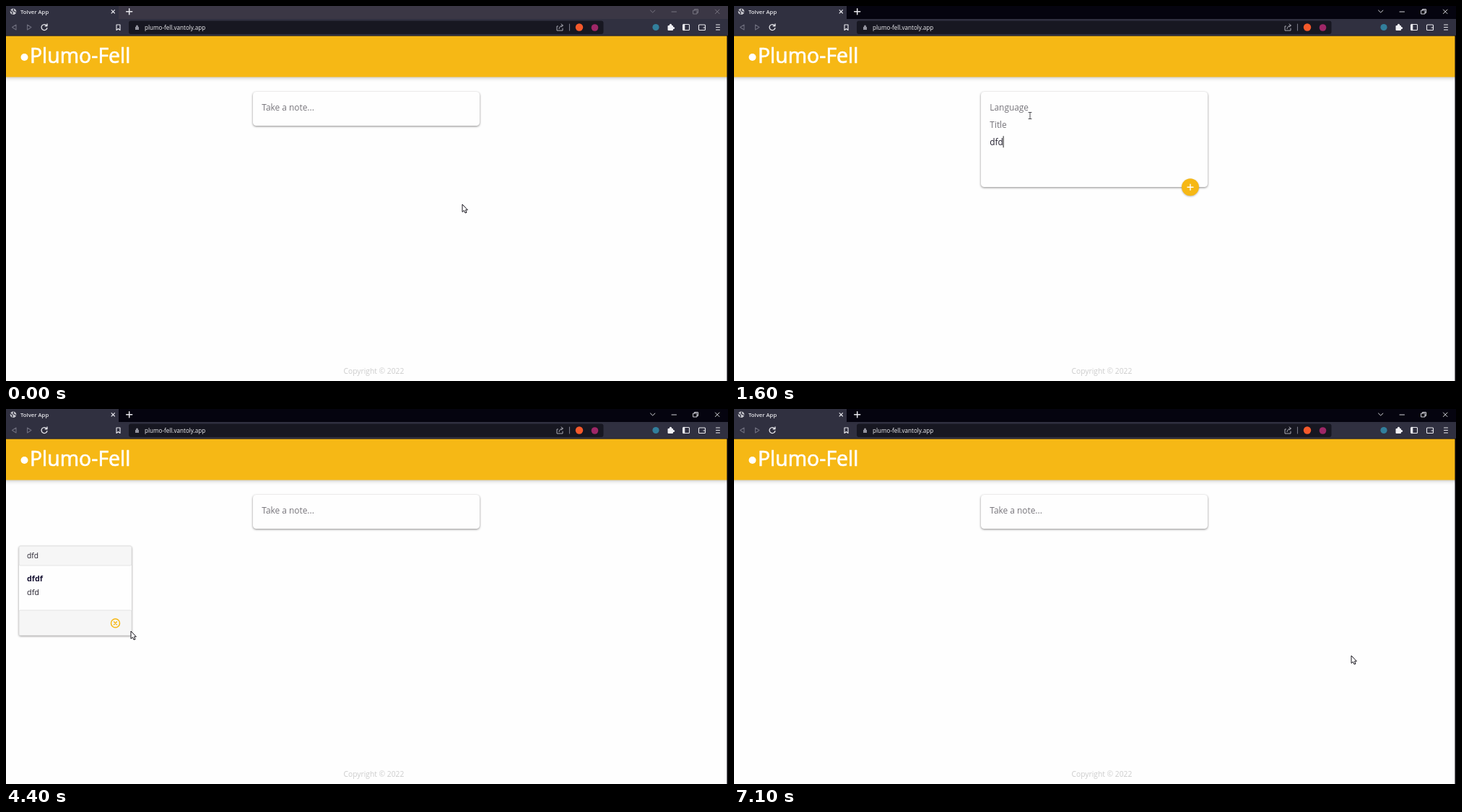
These frames come from a looping animation (1000 px wide and 520 px high, 7200 ms). An HTML page:

```html
<!DOCTYPE html>
<html lang="en">
<head>
<meta charset="utf-8">
<title>Note wall</title>
<style>
html, body { margin: 0; width: 100%; height: 100%; overflow: hidden; background: #fefefe; }
svg { display: block; width: 100vw; height: 100vh; }
text { font-family: "Open Sans", "Noto Sans", sans-serif; white-space: pre; }
.line { fill: none; stroke-linecap: round; stroke-linejoin: round; }
.sheet { fill: #fefefe; filter: drop-shadow(0 1px 1.5px #8a8989); }
.gold { fill: #f6b815; }
.panel { fill: #f6f6f6; stroke: #dedede; stroke-width: .8; }
</style>
</head>
<body>
<svg viewBox="0 0 1000 520">
  <defs>
    <path id="cross" d="M-1-1L1 1M-1 1L1-1" vector-effect="non-scaling-stroke"/>
    <path id="plus" d="M-4 0H4M0-4V4"/>
  </defs>
  <rect width="1000" height="520" fill="#fefefe"/>

  <!-- page -->
  <rect class="gold" x="-10" y="41" width="1020" height="57.5" style="filter: drop-shadow(0 0 3px #0005)"/>
  <circle cx="25.5" cy="71" r="5" fill="#fff"/>
  <text x="33" y="79" font-size="28.4" fill="#fff" stroke="#fff" stroke-width=".7" stroke-linejoin="round">Plumo-Fell</text>
  <text x="467.5" y="510.3" font-size="10.3" fill="#ccc">Copyright © 2022</text>

  <rect id="sheet" class="sheet" x="342" y="119" width="314" rx="4.5"/>
  <g id="rows"></g>
  <path id="caret" stroke="#222" d="M0-8V8"/>
  <g id="add">
    <circle class="gold" r="12" style="filter: drop-shadow(0 1px 1px #0004)"/>
    <use href="#plus" class="line" stroke="#fff" stroke-width="1.4"/>
  </g>

  <g id="card" fill="#26232f">
    <rect class="sheet" x="18" y="190" width="156" height="124" rx="2.5"/>
    <rect class="panel" x="18" y="190" width="156" height="27" rx="2"/>
    <rect class="panel" x="18" y="279" width="156" height="35" rx="2"/>
    <text x="29" y="207" font-size="10.2">dfd</text>
    <text x="29" y="238.5" font-size="10.8" font-weight="700" fill="#171333">dfdf</text>
    <text x="29" y="257.5" font-size="10.9">dfd</text>
    <g class="line" stroke="#f6b815" stroke-width="1.5" transform="translate(151.5 297)">
      <circle r="6"/>
      <use href="#cross" transform="scale(2)"/>
    </g>
  </g>

  <!-- browser -->
  <rect id="bar" width="1000" height="19"/>
  <path d="M0 0H156V18H1000V41H0Z" fill="#303040"/>
  <path d="M0 41.2H1000" stroke="#24222c"/>
  <path d="M999.3 41V520" stroke="#08070d" stroke-width="1.6"/>
  <rect x="170" y="20.5" width="657.5" height="18.5" rx="3" fill="#171721"/>
  <circle cx="10" cy="7.8" r="4.3" fill="#c9c9cf"/>
  <path class="line" d="M6.5 6.5L9 8.5V11M10.5 4.5L10 6.5L13.5 8.5" stroke="#303040" stroke-width="1.3"/>
  <text x="20" y="10.6" font-size="7.7" font-weight="600" fill="#e6e6ea">Tolver App</text>
  <text x="192" y="33" font-size="8.1" fill="#f2f2f5">plumo-fell.vantoly.app</text>

  <g class="line" stroke="#e9e9ee" stroke-width="1.1">
    <use href="#cross" transform="translate(148.3 7.8) scale(2.2)"/>
    <use href="#plus" transform="translate(170.7 7.8)" stroke-width="1.5"/>
    <path d="M14 26V33L8.5 29.5ZM29.5 26V33L35 29.5Z" stroke="#6c6c7b"/>
    <path d="M56.3 27.2a4 4 0 1 0 .6 3.5M57 25v2.8h-2.8" stroke-width="1.3"/>
    <path d="M153 26h5v7.5l-2.5-2l-2.5 2Z"/>
    <path d="M764.5 28H763V34H771V31M766 31.5Q767 27 771 27M769 25L771.5 27L769 29" stroke="#b9b9c2" stroke-width=".9"/>
    <path d="M780.5 25V34" stroke="#777783"/>
    <rect x="937.5" y="25.5" width="9" height="8" rx="1"/>
    <path d="M939 26V33" stroke-width="2.6"/>
    <rect x="959.5" y="26" width="9" height="7.5" rx="1"/>
    <path d="M966 30H968"/>
    <path d="M983.5 26h5m-5 3.5h5m-5 3.5h5"/>
  </g>
  <path d="M179 29h5v4h-5ZM180 29v-1a1.5 1.5 0 0 1 3 0v1" fill="#92929d"/>
  <circle cx="794" cy="29.5" r="5.2" fill="#f4592b"/>
  <circle cx="815.5" cy="30" r="4.8" fill="#9e2767"/>
  <circle cx="900" cy="29.5" r="4.6" fill="#327f9c"/>
  <g fill="#f0f0f4">
    <rect x="916.5" y="27" width="7.5" height="7" rx="1"/>
    <circle cx="920.5" cy="26.5" r="1.7"/>
    <circle cx="924.5" cy="30.5" r="1.6"/>
  </g>
  <g id="controls" class="line">
    <path d="M892.5 6l3.2 3l3.2-3M922 8h6.5"/>
    <path d="M952 6h5v5h-5ZM953.5 6V4.5h5v5H957"/>
    <use href="#cross" transform="translate(985.2 7.8) scale(2.8)"/>
  </g>

  <g id="pointer" stroke="#16141c" stroke-linejoin="round">
    <path id="arrow" d="M0 0V10.5L2.5 8.5L4 12L6 11.3L4.5 7.8H7.4Z" fill="#fff"/>
    <path id="beam" class="line" d="M-2-4.5H2M0-4.5V4.5M-2 4.5H2" stroke="#3d3d42" stroke-width=".9"/>
    <path id="hand" d="M-1 8V0H1V5L6 6.5L5.5 13H0L-3.5 8Z" fill="#fff"/>
  </g>
</svg>
<script>
const LOOP = 7200, STEP = 100, TOP = 145.3, ROW = 24;
const FOCUS = 900, OPEN = 1000, SAVE = 3700, REMOVE = 4900;
const $ = id => document.getElementById(id);
const show = (id, on) => $(id).setAttribute('visibility', on ? 'visible' : 'hidden');
const set = (id, name, value) => $(id).setAttribute(name, value);
const clamp = (v, lo, hi) => Math.min(hi, Math.max(lo, v));
const ease = k => k * k * (3 - 2 * k);

// Each move starts where the pointer stands and eases to (x, y).
const home = { x: 632, y: 275 };
const moves = [
  { from: 50, to: 800, x: 448, y: 154 },
  { from: 1200, to: 1600, x: 410, y: 152 },
  { from: 2200, to: 2600, x: 499, y: 198 },
  { from: 2600, to: 2800, x: 449, y: 184 },
  { from: 3100, to: 3600, x: 632, y: 257 },
  { from: 3700, to: 4400, x: 173, y: 308 },
  { from: 4400, to: 4700, x: 154, y: 299 },
  { from: 5900, to: 6600, x: 213, y: 298 },
  { from: 6600, to: 6900, x: 928, y: 352 },
  { from: 6900, to: 7100, x: 855, y: 342 }
];

const fields = [
  { hint: 'Language', text: 'dfd', start: 1900 },
  { hint: 'Title', text: 'dfdf', start: 2800 },
  { hint: 'Take a note...', text: 'dfd', start: 1300 }
];
const note = fields[2];
fields.forEach((f, i) => {
  f.y = TOP + ROW * i;
  f.el = document.createElementNS('http://www.w3.org/2000/svg', 'text');
  f.el.setAttribute('x', 354.3);
  $('rows').append(f.el);
});

function pointerAt(t) {
  return moves.reduce((p, m) => {
    const k = ease(clamp((t - m.from) / (m.to - m.from), 0, 1));
    return { x: p.x + (m.x - p.x) * k, y: p.y + (m.y - p.y) * k };
  }, home);
}

function drawField(f, t, open) {
  const typed = open ? f.text.slice(0, clamp((t - f.start) / STEP + 1, 0, f.text.length)) : '';
  f.el.textContent = typed || (open || f === note ? f.hint : '');
  f.el.setAttribute('y', open ? f.y : TOP);
  f.el.setAttribute('fill', typed ? '#211e2d' : '#77757b');
  f.el.setAttribute('font-size', 11.9);
  f.width = typed ? f.el.getComputedTextLength() : 0;
}

function drawForm(t, open) {
  set('sheet', 'height', open ? 132 : 47);
  fields.forEach(f => drawField(f, t, open));
  const focus = t < 1800 ? note : fields[t < 2400 ? 0 : 1];
  show('caret', open);
  set('caret', 'transform', `translate(${354.5 + focus.width} ${focus.y - 5})`);
  show('add', open);
  set('add', 'transform', `translate(632 251.3) scale(${clamp((t - OPEN) / 300, 0, 1) ** 2})`);
}

function drawPointer(t, open, card) {
  const { x, y } = pointerAt(t);
  const near = (cx, cy, r) => Math.hypot(x - cx, y - cy) < r;
  const hand = open && near(632, 251, 12) || card && near(151.5, 297, 8);
  const beam = !hand && x > 342 && x < 656 && y > 119 && y < (open ? 251 : 166);
  show('hand', hand);
  show('beam', beam);
  show('arrow', !hand && !beam);
  set('pointer', 'transform', `translate(${x} ${y})`);
}

function draw(t) {
  const active = t >= FOCUS, open = t >= OPEN && t < SAVE;
  const card = t >= SAVE && t < REMOVE;
  set('bar', 'fill', active ? '#05040f' : '#3b3745');
  set('controls', 'stroke', active ? '#d2d2d8' : '#777480');
  show('card', card);
  drawForm(t, open);
  drawPointer(t, open, card);
}

const begin = performance.now();
function tick() {
  const t = (performance.now() - begin) % LOOP;
  draw(Math.floor(t / STEP) * STEP);
  requestAnimationFrame(tick);
}
tick();
</script>
</body>
</html>
```
